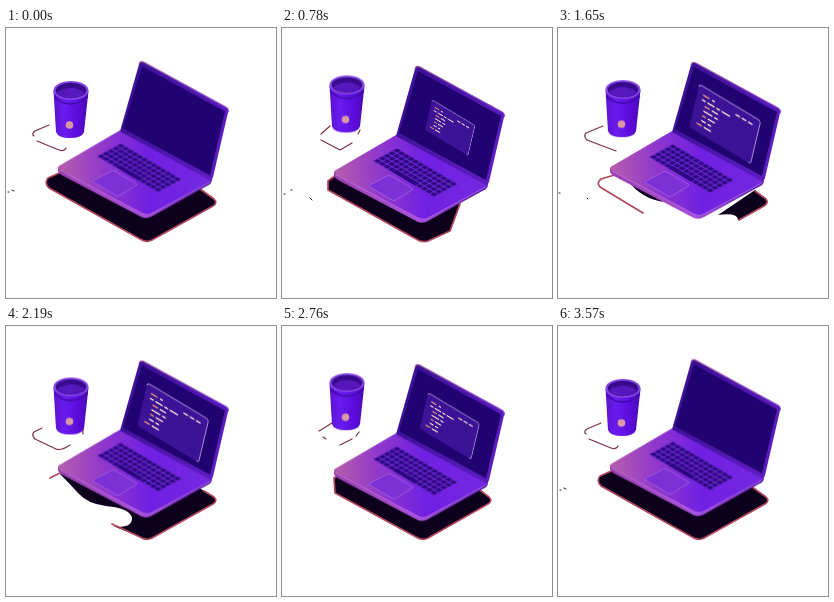
Animation of 270 by 270 pixels, one loop 3.63 s. Source, as an HTML page:

```html
<!DOCTYPE html>
<html lang="en">
<head>
<meta charset="utf-8">
<title>Floating laptop</title>
<style>
  html, body { margin: 0; width: 100%; height: 100%; overflow: hidden; background: #fff; }
  svg { display: block; width: 100vw; height: 100vh; }

  .laptop, .cup { animation: 3630ms cubic-bezier(.37, 0, .63, 1) infinite; }
  .laptop { animation-name: sink; }
  .cup { animation-name: rise; }
  @keyframes sink {
    0%, 52.3%, 100% { transform: translateY(.3px); }
    25%, 75.7% { transform: translateY(5.2px); }
  }
  @keyframes rise {
    0%, 52.3%, 100% { transform: none; }
    25%, 75.7% { transform: translateY(-5.8px); }
  }

  .panel { animation: open 3630ms cubic-bezier(.4, 0, .6, 1) infinite; }
  @keyframes open {
    0%, 100% { transform: translate(3px, -3px) scale(0); }
    34.5%, 67% { transform: none; }
  }

  /* the ground is a strip of six views, switched without blending */
  .ground { animation: ground 3630ms step-end infinite; }
  @keyframes ground {
    0% { transform: translateX(0); }
    10.74% { transform: translateX(-270px); }
    28.1% { transform: translateX(-540px); }
    40.08% { transform: translateX(-810px); }
    52.89% { transform: translateX(-1080px); }
    68.18% { transform: translateX(-1350px); }
    87.19% { transform: translateX(0); }
  }
  .ground path { fill: none; stroke-width: 1.7; stroke-linecap: round; stroke-linejoin: round; }
  .ground .dark { fill: #0d001c; }
  .red { stroke: #b0485c; }
  .ground .trace { stroke: #7c3048; stroke-width: 1.2; }
  .ground .ink { stroke: #2a0b24; stroke-width: 1; }

  .code path { fill: none; stroke: #ffe6d8; stroke-width: 1.5; }
  .code .o { stroke: #e9a07c; }
</style>
</head>
<body>
<svg viewBox="0 0 270 270">
  <defs>
    <linearGradient id="deck" gradientUnits="userSpaceOnUse" x1="58" y1="150" x2="200" y2="142">
      <stop offset="0" stop-color="#b25aae"/>
      <stop offset=".28" stop-color="#9138cc"/>
      <stop offset=".6" stop-color="#7020e2"/>
      <stop offset="1" stop-color="#7428e0"/>
    </linearGradient>
    <linearGradient id="edge" gradientUnits="userSpaceOnUse" x1="52" y1="0" x2="206" y2="0">
      <stop offset="0" stop-color="#9a3fae"/>
      <stop offset=".55" stop-color="#a850dc"/>
      <stop offset="1" stop-color="#4a12a0"/>
    </linearGradient>
    <linearGradient id="lid" gradientUnits="userSpaceOnUse" x1="125" y1="50" x2="222" y2="100">
      <stop offset="0" stop-color="#3c1096"/>
      <stop offset="1" stop-color="#5c1cc0"/>
    </linearGradient>
    <linearGradient id="rim" gradientUnits="userSpaceOnUse" x1="135" y1="33" x2="222" y2="81">
      <stop offset="0" stop-color="#9c5a9c"/>
      <stop offset="1" stop-color="#7a38c8"/>
    </linearGradient>
    <linearGradient id="body">
      <stop offset="0" stop-color="#5a12cc"/>
      <stop offset=".3" stop-color="#6a1cf0"/>
      <stop offset=".7" stop-color="#5c0cdc"/>
      <stop offset="1" stop-color="#4a0ab4"/>
    </linearGradient>
    <pattern id="keys" width="1" height="1" patternUnits="userSpaceOnUse">
      <rect x=".1" y=".12" width=".8" height=".76" rx=".12" fill="#2b0880"/>
    </pattern>
  </defs>

  <g class="ground">
    <g>
      <path class="dark red" d="M42 150L62 141L190 158L208 171Q212 175 207 178L146 212Q140 215 134 211L43 160Q38 155 42 150Z"/>
      <path class="trace" d="M43 97L29 103Q25 106 28 108M31 113L53 122Q58 124 60 120"/>
      <path class="ink" d="M2 164h1M6 162l2 1"/>
    </g>
    <g transform="translate(270)">
      <path class="dark red" d="M46 153L62 141L178 176L168 203L146 213Q140 215 134 211L46 162Z"/>
      <path class="trace" d="M48 98L39 106M39 112L58 122L70 115M76 106l2 -4"/>
      <path class="ink" d="M2 166h1M9 162h1M28 170l2 2"/>
    </g>
    <g transform="translate(540)">
      <path class="dark" d="M40 153L60 144L130 187Q112 179 111 193L104 193L41 159Z"/>
      <path class="red" d="M60 144L42 151Q38 155 42 159L123 207"/>
      <path class="red" d="M195 163L207 170Q210 174 206 178L199 183"/>
      <path class="trace" d="M45 97L28 106M27 111l5 5M77 101l-3 8"/>
      <path class="ink" d="M10 168h1"/>
    </g>
    <g transform="translate(810)">
      <path class="dark" d="M160 187L197 162L208 171Q211 175 206 178L180 192Q180 184 160 187Z"/>
      <path class="dark" d="M70 153L106 174Q84 171 70 153Z"/>
      <path class="red" d="M60 146L43 151Q38 155 42 159L85 185M197 163L208 171Q211 175 206 178L181 192"/>
      <path class="trace" d="M45 98L28 105Q25 108 29 112L58 123"/>
      <path class="ink" d="M1 165h1M29 170l1 1"/>
    </g>
    <g transform="translate(1080)">
      <path class="dark" d="M54 148L64 144L190 160L208 171Q212 175 207 178L146 212Q140 215 134 211L107 200Q126 203 126 192Q124 182 100 180Q82 178 72 167Q64 158 54 148Z"/>
      <path class="red" d="M44 152L56 146M106 198L134 211Q140 215 146 212L207 178Q212 175 208 171L198 165"/>
      <path class="trace" d="M36 102L28 106Q25 109 29 113L50 123Q55 125 64 119M77 100v8"/>
    </g>
    <g transform="translate(1350)">
      <path class="dark red" d="M52 152L64 144L190 158L207 171Q211 175 206 178L146 212Q140 215 134 211L53 167Z"/>
      <path class="trace" d="M50 97L37 105M41 111l3 2M58 119l12 -6M74 110l3 -4"/>
    </g>
  </g>

  <g class="cup">
    <path d="M47.500 63L50 104Q52 110 64 110Q76 110 78 104L82.500 63Z" fill="url(#body)"/>
    <path d="M48.300 69Q64 83 82 69" fill="none" stroke="#3f0aa4" stroke-width="1.300"/>
    <ellipse cx="65" cy="62.500" rx="17.500" ry="9.500" fill="#8546e4"/>
    <ellipse cx="65" cy="62.500" rx="15.300" ry="7.700" fill="#380a8c"/>
    <path d="M51 64.500Q65 55 79 64.500Q75 70 65 70.200Q55 70 51 64.500Z" fill="#5618bc"/>
    <circle cx="63.500" cy="97" r="3.800" fill="#d99aa6"/>
  </g>

  <g class="laptop">
    <path d="M52 139L52 143Q53 145 56 147L136 189Q141 191 146 188L204 156Q206 154 206 151Z" fill="url(#edge)"/>
    <path d="M54 137L114 102L205 150Q207 152 204 154L146 185Q141 188 136 185L54 142Q50 139 54 137Z" fill="url(#deck)"/>
    <path d="M54 142L136 185Q141 188 146 185L204 154" fill="none" stroke="#c07ae8" stroke-width=".7"/>
    <g transform="matrix(4.690 2.770 -4.800 2.600 115 115)">
      <path d="M0 0H13V5H0Z" fill="#6a24cc"/>
      <path d="M0 0H13V5H0Z" fill="url(#keys)"/>
      <path d="M4 4.100H8.900V4.900H4Z" fill="#2b0880"/>
    </g>
    <path d="M88 152L105 143Q107 142 109 143L130 155Q132 156 130 157L114 167Q112 168 110 167L88 154Q86 153 88 152Z" fill="#7d30d6" stroke="#a96be0" stroke-width=".7"/>

    <path d="M133 36Q134 32 138 34L220 79Q223 81 222 84L207 149Q206 153 202 151L114 103Z" fill="url(#lid)"/>
    <path d="M133 36Q134 32 138 34L220 79Q223 81 222 84" fill="none" stroke="url(#rim)" stroke-width="1.300"/>
    <path d="M136 38L219 83L204 147L117 100Z" fill="#200370"/>
    <g transform="matrix(.900 .540 -.220 .930 167 95)">
      <g class="panel">
        <rect x="-34" y="-23" width="68" height="46" rx="2.500" fill="#3c1296"/>
        <path d="M-34 -20.500Q-34 -23 -31.500 -23H31.500Q34 -23 34 -20.500V20.500Q34 23 31.500 23" fill="none" stroke="#b596e4" stroke-width=".9"/>
        <g class="code">
          <path class="o" d="M-28 -15h7M-24 -5h6M-24 5h4M-28 15h6"/>
          <path d="M-18 -15h3M8 -15h5M15 -15h5M22 -15h5"/>
          <path d="M-28 -10h4M-22 -10h8M-12 -10h4M-6 -10h9"/>
          <path d="M-16 -5h7M-24 0h10M-12 0h4M-18 5h8"/>
          <path d="M-24 10h5M-17 10h4M-20 15h8"/>
        </g>
      </g>
    </g>
  </g>
</svg>
</body>
</html>
```
